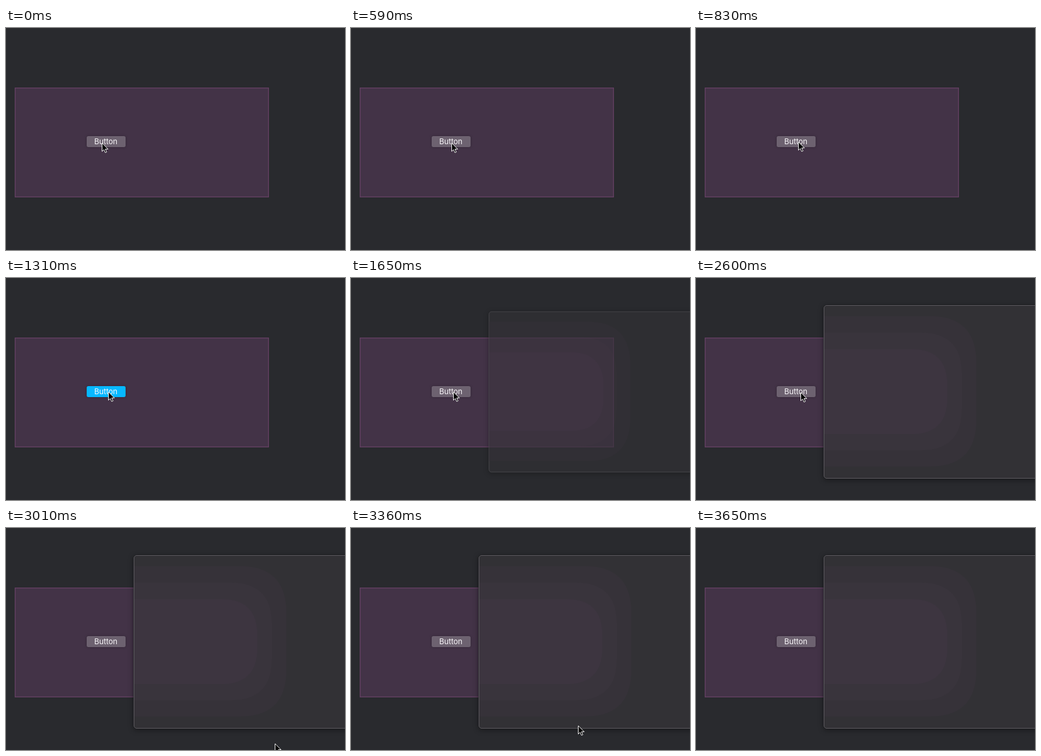
Write an HTML page that moves like this. It is 584 px wide and 384 px high and loops after 4.33 s.

```html
<!DOCTYPE html>
<html lang="en">
<head>
<meta charset="utf-8">
<title>Button opens a window</title>
<style>
  html, body { margin: 0; width: 100%; height: 100%; overflow: hidden; background: #292a2e; }
  svg { display: block; }
  text { font: 13px Inter, "Open Sans", sans-serif; fill: #fbf8fb; }
  #button { filter: drop-shadow(0 .5px 2px rgba(0, 0, 0, .25)); }
  #frame { filter: drop-shadow(0 2px 5px rgba(0, 0, 0, .42)); }
</style>
</head>
<body>
<svg width="584" height="384" viewBox="0 0 584 384">
  <rect x="15.75" y="103.75" width="436.5" height="188.5" fill="#433347" stroke="#623f61" stroke-width="1.5"/>
  <rect id="button" x="139" y="187" width="67" height="19" rx="3"/>
  <text x="172" y="201" text-anchor="middle">Button</text>

  <g id="window">
    <rect id="frame" x="219.5" y="46.5" width="481" height="301" rx="5.5" fill="#1b1b1e"/>
    <rect x="220.5" y="47.5" width="479" height="299" rx="4.5" fill="#323135" stroke="#605e63"/>
    <g id="glow"></g>
  </g>

  <path id="cursor" d="M.5 0V14.4L3.7 11.4L6 16.6L8.4 15.6L6.1 10.5H10.8Z"
        fill="#000" stroke="#fff" stroke-linejoin="round"/>
</svg>
<script>
const LOOP = 4330;
const $ = id => document.getElementById(id);

// Tint of the blurred panel behind the window, in three nested bands
for (let i = 0; i < 3; i++) {
  const right = 483 - 25 * i, top = 66 + 28.5 * i, bottom = 326 - 28 * i, r = 80 - 9 * i;
  const fill = `rgb(${[50, 49, 53].map((c, k) => Math.round(c + (i + 1) * [3.7, 1.3, 3.7][k]))})`;
  $('glow').innerHTML +=
    `<path fill="${fill}" d="M221 ${top}H${right - r}Q${right} ${top} ${right} ${top + r}` +
    `V${bottom - r}Q${right} ${bottom} ${right - r} ${bottom}H221Z"/>`;
}

// Progress 0..1 held in equal steps, the first at `from` and the last at `to`
function stepped(t, from, to, steps) {
  const i = Math.floor((t - from) / (to - from) * (steps - 1) + .1);
  return Math.min(i / (steps - 1), 1);
}

const linear = p => p;
const smooth = p => p * p * (3 - 2 * p);

// Each move follows one cubic curve
const moves = [
  { from: 360, to: 830, steps: 9, ease: linear, curve: [[166, 199], [172, 200], [175, 199], [176, 197]] },
  { from: 2600, to: 3070, steps: 9, ease: smooth, curve: [[180, 198], [230, 260], [379, 314], [476, 382]] },
  { from: 3130, to: 3650, steps: 10, ease: linear, curve: [[477, 376], [430, 328], [330, 330], [268, 390]] }
];

function bezier([a, b, c, d], p) {
  const q = 1 - p;
  return a.map((_, k) =>
    q * q * q * a[k] + 3 * q * q * p * b[k] + 3 * q * p * p * c[k] + p * p * p * d[k]);
}

function cursorAt(t) {
  const move = moves.filter(m => t >= m.from).pop();
  if (!move) return [165, 199];
  const p = move.ease(stepped(t, move.from, move.to, move.steps));
  return bezier(move.curve, p).map(Math.round);
}

function draw(t) {
  const pressed = t >= 1310 && t < 1420;
  $('button').setAttribute('fill', pressed ? '#06b8ff' : '#6d6270');

  const open = t < 1590 ? 0 : .2 + .8 * stepped(t, 1590, 1820, 5);
  const ease = 1 - (1 - open) ** 2;
  const scale = .8 + .2 * ease;
  $('window').style.opacity = ease;
  $('window').setAttribute('transform', `translate(460 197) scale(${scale}) translate(-460 -197)`);

  $('cursor').setAttribute('transform', `translate(${cursorAt(t)})`);
}

const start = performance.now();
function tick(now) {
  draw(Math.max(0, now - start) % LOOP);
  requestAnimationFrame(tick);
}
draw(0);
requestAnimationFrame(tick);
</script>
</body>
</html>
```
